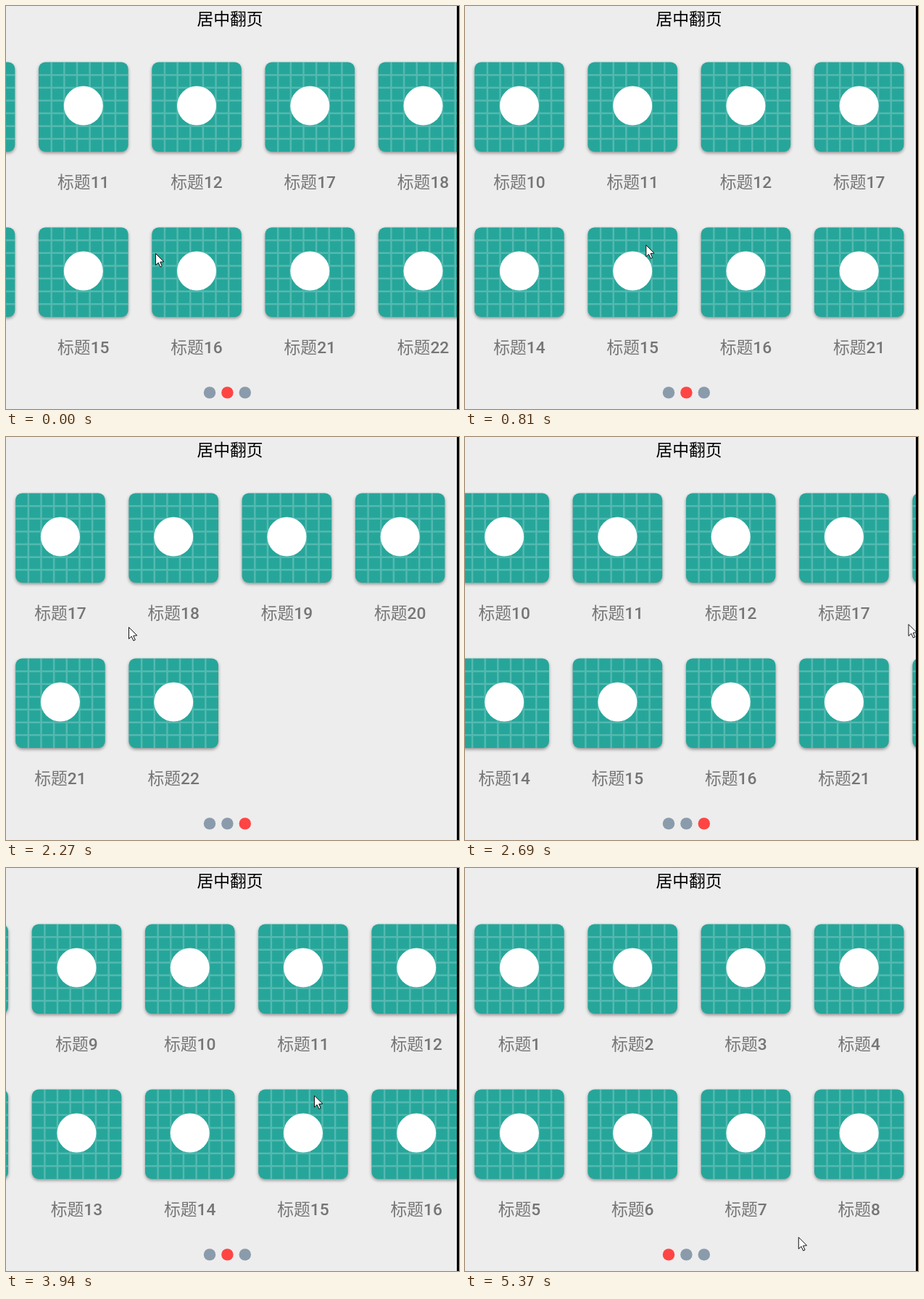
Animation of 625x556 px, one loop 5800 ms. Source, as an HTML page with a canvas:

```html
<!DOCTYPE html>
<html lang="zh-CN">
<head>
<meta charset="utf-8">
<style>
html, body { margin: 0; width: 100%; height: 100%; overflow: hidden; background: #ededed; }
canvas { display: block; }
</style>
</head>
<body>
<canvas id="stage" width="625" height="556"></canvas>
<script>
const ctx = document.getElementById('stage').getContext('2d');
const LOOP = 5800, STEP = 140.5, LEAD = 30; // the screen refreshes once per STEP ms
const PAGE = 625, PITCH = PAGE / 4, TILE = 123.5;
const FONT = '22.8px Roboto, "Noto Sans CJK SC", "Noto Sans CJK", sans-serif';

// Times below count refreshes.
const swipes = [
  { from: -6.4, to: 4, by: -0.75 * PAGE },
  { from: 6, to: 12, by: 0.75 * PAGE },
  { from: 16, to: 19, by: -448 },
  { from: 21, to: 24, by: 448 - PAGE },
  { from: 27, to: 32.15, by: -PAGE }
];

// [time, x, y]
const cursorPath = [
  [0, 206, 341], [6, 258, 327], [8, 171, 327], [11, 171, 327], [13, 279, 342],
  [16, 169, 262], [18, 612, 258], [24, 609, 258], [27, 210, 297],
  [29, 640, 330], [32, 640, 330], [35, 399, 356], [39, 480, 560]
];

// Slow drag, quick release, long settling.
const fling = p => 1 - (1 - p ** 3) ** 5;
const clamp = p => Math.min(1, Math.max(0, p));

const scrollAt = n => swipes.reduce(
  (sum, s) => sum + s.by * fling(clamp((n - s.from) / (s.to - s.from))), 2 * PAGE);

const pageAt = n => 1 + (n >= 13) - (n >= 22) - (n >= 33);

function cursorAt(n) {
  const i = cursorPath.findLastIndex(k => k[0] <= n);
  const [t0, x0, y0] = cursorPath[i];
  const [t1, x1, y1] = cursorPath[i + 1] || [t0 + 1, x0, y0];
  const p = (n - t0) / (t1 - t0);
  return [x0 + (x1 - x0) * p, y0 + (y1 - y0) * p];
}

function circle(x, y, r, color) {
  ctx.fillStyle = color;
  ctx.beginPath();
  ctx.arc(x, y, r, 0, Math.PI * 2);
  ctx.fill();
}

function text(str, x, y, color) {
  ctx.font = '500 ' + FONT;
  ctx.textAlign = 'center';
  ctx.fillStyle = color;
  ctx.fillText(str, x, y);
}

function drawTile(x, y, number) {
  ctx.save();
  ctx.translate(x, y);
  ctx.beginPath();
  ctx.roundRect(0, 0, TILE, TILE, 9);
  ctx.shadowColor = 'rgba(0,0,0,.4)';
  ctx.shadowBlur = 4;
  ctx.shadowOffsetY = 2;
  ctx.fillStyle = '#26a69a';
  ctx.fill();
  ctx.shadowColor = 'transparent';
  ctx.strokeStyle = 'rgba(255,255,255,.21)';
  ctx.lineWidth = 2.5;
  ctx.beginPath();
  for (let i = 1; i < 7; i++) {
    const p = i * TILE / 7;
    ctx.moveTo(p, 0);
    ctx.lineTo(p, TILE);
    ctx.moveTo(0, p);
    ctx.lineTo(TILE, p);
  }
  ctx.stroke();
  circle(TILE / 2, 60, 27, '#fff');
  text('标题' + number, TILE / 2, 173, '#757575');
  ctx.restore();
}

function drawCursor(x, y) {
  ctx.save();
  ctx.translate(x + .5, y + .5);
  ctx.fillStyle = '#fff';
  ctx.strokeStyle = '#111';
  ctx.lineWidth = 1;
  const arrow = new Path2D('M0 0V16L3.7 12.6L6.4 18.5L8.8 17.4L6.2 11.7L11.3 11.3Z');
  ctx.fill(arrow);
  ctx.stroke(arrow);
  ctx.restore();
}

function draw(n) {
  const scroll = scrollAt(n), page = pageAt(n);
  ctx.fillStyle = '#ededed';
  ctx.fillRect(0, 0, 625, 556);
  text('居中翻页', 309, 26, '#000');

  for (let i = 0; i < 22; i++) {
    const col = Math.floor(i / 8) * 4 + i % 4;
    const row = Math.floor(i / 4) % 2;
    drawTile(13.2 + col * PITCH - scroll, 77.5 + row * 228, i + 1);
  }
  for (let i = 0; i < 3; i++) {
    circle(281 + i * 24.4, 533.4, 8.2, i === page ? '#ff4444' : '#8a9bab');
  }
  ctx.fillStyle = '#000';
  ctx.fillRect(622, 0, 3, 556);
  drawCursor(...cursorAt(n));
}

const start = performance.now();
function frame() {
  const t = (performance.now() - start) % LOOP;
  draw(Math.floor((t + LEAD) / STEP));
  requestAnimationFrame(frame);
}
frame();
</script>
</body>
</html>
```
